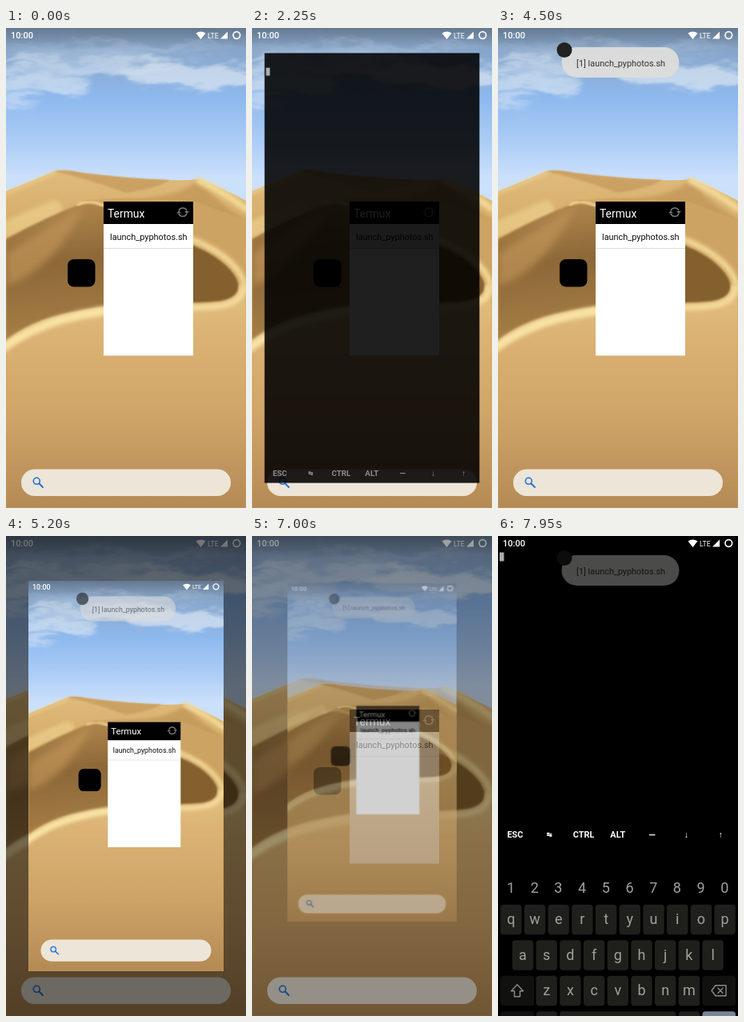
Animation of 300x600 px, one loop 8000 ms. Source, as an HTML page:

```html
<!DOCTYPE html>
<html lang="en">
<head>
<meta charset="utf-8">
<title>Launching a script from a widget</title>
<style>
html, body { margin: 0; width: 100%; height: 100%; overflow: hidden; background: #000; }
svg { display: block; width: 100vw; height: 100vh; }
text { font-family: Roboto, sans-serif; }
.mid { text-anchor: middle; }
.line { fill: none; stroke-linecap: round; stroke-linejoin: round; }
</style>
</head>
<body>
<svg viewBox="0 0 300 600">
  <defs>
    <linearGradient id="sky" x2="0" y2="1">
      <stop offset="0" stop-color="#64788f"/>
      <stop offset=".12" stop-color="#86a4c8"/>
      <stop offset=".4" stop-color="#8eb9ee"/>
      <stop offset=".65" stop-color="#accdf6"/>
      <stop offset=".85" stop-color="#cbe0fb"/>
    </linearGradient>
    <linearGradient id="far" x2="0" y2="1">
      <stop offset="0" stop-color="#e0bb7c"/>
      <stop offset=".2" stop-color="#d3a966"/>
      <stop offset="1" stop-color="#c39856"/>
    </linearGradient>
    <linearGradient id="face" x2=".2" y2="1">
      <stop offset="0" stop-color="#b58b50"/>
      <stop offset=".45" stop-color="#8d6838"/>
      <stop offset="1" stop-color="#a98048"/>
    </linearGradient>
    <linearGradient id="near" x2="0" y2="1">
      <stop offset="0" stop-color="#e4c180"/>
      <stop offset=".25" stop-color="#dab273"/>
      <stop offset=".6" stop-color="#cfa468"/>
      <stop offset="1" stop-color="#b48a55"/>
    </linearGradient>
    <filter id="cloud" x="-20%" y="-30%" width="140%" height="160%">
      <feGaussianBlur stdDeviation="6 4" result="b"/>
      <feTurbulence type="fractalNoise" baseFrequency=".018 .05" numOctaves="4" seed="4"/>
      <feDisplacementMap in="b" scale="45" xChannelSelector="R" yChannelSelector="G"/>
    </filter>
    <filter id="soft" x="-20%" y="-50%" width="140%" height="200%"><feGaussianBlur stdDeviation="5"/></filter>
    <filter id="edge" x="-10%" y="-20%" width="120%" height="140%"><feGaussianBlur stdDeviation="1"/></filter>
    <filter id="glow" x="-20%" y="-30%" width="140%" height="160%"><feGaussianBlur stdDeviation="2.500"/></filter>
    <clipPath id="stage"><rect width="300" height="600"/></clipPath>
    <clipPath id="row"><rect x="122" y="245" width="112" height="31"/></clipPath>

    <g id="wall" clip-path="url(#stage)">
      <rect width="300" height="220" fill="url(#sky)"/>
      <g filter="url(#cloud)" fill="#eaf0f6">
        <ellipse cx="100" cy="44" rx="110" ry="10" opacity=".5"/>
        <ellipse cx="225" cy="58" rx="90" ry="14" opacity=".6"/>
        <ellipse cx="40" cy="68" rx="60" ry="13" opacity=".55"/>
        <ellipse cx="5" cy="92" rx="32" ry="7" opacity=".5"/>
        <ellipse cx="140" cy="26" rx="150" ry="5" opacity=".25"/>
      </g>
      <path d="M0 204Q35 190 60 179Q72 176 95 181Q150 188 205 190Q225 191 240 189Q262 196 300 216V600H0Z" fill="url(#far)"/>
      <path d="M60 179Q72 176 95 181Q150 188 205 190Q190 200 150 206Q100 188 60 179Z" fill="#c3995a" opacity=".7" filter="url(#edge)"/>
      <path d="M240 189Q225 208 170 214L234 226Q280 235 300 275V240Q265 220 240 189Z" fill="#b98e50" opacity=".6" filter="url(#glow)"/>
      <g class="line" stroke="#f3d996" filter="url(#glow)">
        <path d="M241 191Q268 202 300 226" stroke-width="8"/>
        <path d="M-5 208Q30 194 60 181" stroke-width="4" opacity=".7"/>
        <path d="M-5 254Q25 240 60 226" stroke-width="20" opacity=".55"/>
      </g>
      <path d="M0 264Q50 236 103 216Q125 224 150 238Q195 270 240 275Q300 295 300 345L230 352Q120 345 60 368Q25 380 0 396Z" fill="url(#face)" filter="url(#edge)"/>
      <path d="M0 282Q50 250 98 222Q75 270 40 300Q20 316 0 322Z" fill="#c09458" opacity=".7" filter="url(#soft)"/>
      <path d="M103 216Q165 236 210 262Q260 280 300 340V240L240 218Q170 208 103 216Z" fill="#cda363" filter="url(#edge)"/>
      <path class="line" d="M90 221Q103 214 122 222" stroke="#efd392" stroke-width="3" filter="url(#edge)"/>
      <path d="M200 262Q234 268 262 286Q290 306 291 324Q289 339 262 342L180 345Z" fill="#84602f" filter="url(#edge)"/>
      <path class="line" d="M195 254Q236 262 264 280Q297 302 299 326" stroke="#f3d996" stroke-width="7" filter="url(#glow)"/>
      <path d="M0 391Q28 368 70 358Q130 344 190 344Q240 345 268 342Q291 338 291 322L300 318V600H0Z" fill="url(#near)" filter="url(#edge)"/>
      <g class="line" stroke="#f8e2a4" filter="url(#glow)">
        <path d="M-6 402Q26 377 72 364Q120 351 170 350" stroke-width="11"/>
        <path d="M200 349Q245 351 270 347Q296 342 297 324" stroke-width="7" opacity=".85"/>
      </g>
    </g>

    <g id="widget">
      <rect x="77" y="289" width="34.500" height="34.500" rx="8"/>
      <rect x="122" y="217" width="112" height="192.500" fill="#fff"/>
      <rect x="122" y="217" width="112" height="28"/>
      <text x="127" y="236.500" font-size="13.900" fill="#fff">Termux</text>
      <g fill="none" stroke="#777" stroke-width="1.600">
        <path d="M216 228.500A5.300 5.300 0 0 1 226 228.500M226 232A5.300 5.300 0 0 1 216 232"/>
        <path d="M223 229H229L226 232ZM213 231.500H219L216 228.500Z" fill="#777" stroke="none"/>
      </g>
      <rect x="122" y="275" width="112" height="1" fill="#ddd"/>
    </g>
    <text id="item" x="130" y="264.500" font-size="10.900" fill="#111">launch_pyphotos.sh</text>

    <g id="search">
      <rect x="19" y="551.500" width="262" height="33.500" rx="16.700" fill="#ede5d7"/>
      <path class="line" d="M41.500 569.500L46 574" stroke="#1a6fdc" stroke-width="1.800"/>
      <circle cx="38.300" cy="566.300" r="4" fill="none" stroke="#1a6fdc" stroke-width="1.600"/>
    </g>

    <g id="status" fill="#fff">
      <text x="6" y="13" font-size="11" font-weight="500">10:00</text>
      <path d="M237.500 6.500Q243.500 2.500 249.500 6.500L243.500 14Z"/>
      <text x="252" y="12.500" font-size="8.800">LTE</text>
      <path d="M268 13.500H277V4.500Z"/>
      <circle cx="288.300" cy="9" r="4.300" fill="none" stroke="#fff" stroke-width="1.700"/>
    </g>

    <g id="toast">
      <rect x="79.500" y="24" width="147" height="38" rx="19" fill="#dedddb" opacity=".95"/>
      <text x="98" y="47.500" font-size="10.900" fill="#333">[1] launch_pyphotos.sh</text>
      <circle cx="83" cy="27.500" r="9.500" fill="#222"/>
    </g>
  </defs>

  <use href="#wall"/>
  <use href="#widget"/>
  <g clip-path="url(#row)"><circle id="ripple" cx="180" cy="261" r="37"/></g>
  <use href="#item"/>
  <use href="#search"/>

  <g id="term">
    <rect width="300" height="600"/>
    <rect x="2" y="20.500" width="5.500" height="11" fill="#aaa"/>
    <g id="extra" class="mid" fill="#fff" font-size="10.900" font-weight="700"></g>
  </g>
  <g id="keys" class="mid" font-size="18" fill="#a0a09c"></g>
  <use href="#status"/>
  <use id="note" href="#toast"/>

  <rect id="scrim" width="300" height="600"/>
  <g id="shot">
    <use href="#wall"/>
    <use href="#widget"/>
    <use href="#item"/>
    <use href="#search"/>
    <use href="#status"/>
    <use href="#toast" opacity=".6"/>
  </g>
  <g id="tools" class="line" stroke="#fff" stroke-width="1.500">
    <path d="M34 561L42 557M34 563L42 568"/>
    <g fill="#333"><circle cx="32" cy="562" r="2.600"/><circle cx="43.500" cy="556.500" r="2.600"/><circle cx="43.500" cy="568.500" r="2.600"/></g>
    <path d="M105 570V566.500L115.500 556Q117 554.500 118.500 556L119 556.500Q120.500 558 119 559.500L108.500 570ZM113.500 558L117 561.500"/>
    <path stroke="#aaa" stroke-width="1.300" d="M182 559V555H193V559M182 565V569.500H193V565M193 560V563M182 561V563M180 555L195 570"/>
    <path d="M256.500 557H268.500M260 557V554.500H265V557M257.500 557V570H267.500V557M261 560.500V566.500M264 560.500V566.500"/>
  </g>
  <rect id="flash" width="300" height="600" fill="#fff"/>
</svg>
<script>
const $ = id => document.getElementById(id);
const clamp = x => Math.max(0, Math.min(1, x));
const ramp = (t, from, dur) => clamp((t - from) / dur);
const smooth = x => x * x * (3 - 2 * x);
const out = (x, n) => 1 - Math.pow(1 - x, n);
const fade = (id, a) => {
  $(id).setAttribute('opacity', a.toFixed(3));
  $(id).setAttribute('display', a > 0 ? 'inline' : 'none');
};
const scaled = (id, s, dy = 0) =>
  $(id).setAttribute('transform', `translate(150 ${300 + dy}) scale(${s}) translate(-150 -300)`);

const KEYBOARD = 214;   // height of the soft keyboard
const LOOP = 8000;
const TAPS = [2000, 7550];

function buildKeys() {
  const label = (x, y, s, extra = '') => `<text x="${x}" y="${y}" ${extra}>${s}</text>`;
  const key = (x, y, w, fill = '#1f1f1c') =>
    `<rect x="${x}" y="${y}" width="${w}" height="37.500" rx="4" fill="${fill}"/>`;
  const row = (chars, x0, y) => [...chars].map((c, i) => {
    const x = x0 + i * 29.7;
    return key(x - 13.2, y, 26.4) + label(x, y + 24.5, c);
  }).join('');

  $('extra').innerHTML = ['ESC', '↹', 'CTRL', 'ALT', '―', '↓', '↑']
    .map((s, i) => label(21.4 + i * 42.8, i === 1 ? 376 : 377, s, i === 1 ? 'font-size="8"' : '')).join('');

  // Laid out with its top edge at y = 386
  $('keys').innerHTML = `<rect y="386" width="300" height="${KEYBOARD}" fill="#000"/>` +
    [...'1234567890'].map((c, i) => label(16 + i * 29.7, 409.5, c)).join('') +
    row('qwertyuiop', 16.3, 424) + row('asdfghjkl', 31, 468.5) + row('zxcvbnm', 60.7, 513) +
    key(3, 513, 42, '#11110f') + key(255.5, 513, 41.5, '#11110f') +
    key(3, 557.5, 42, '#11110f') + key(48, 557.5, 26) + key(77, 557.5, 145.5) +
    key(226, 557.5, 26) + key(255.5, 557.5, 41.5, '#778696') +
    `<g class="line" stroke="#8c8c88" stroke-width="1.400">
      <path d="M24 524L31.500 532H27.500V539H20.500V532H16.500Z"/>
      <path d="M267 531.500L272 525H285V538H272ZM275 528.500L281 534.500M281 528.500L275 534.500"/></g>`;
}

function draw(t) {
  const tap = t >= TAPS[1] ? TAPS[1] : TAPS[0];
  const d = t - tap;
  const first = tap === TAPS[0];

  // Ripple on the tapped row
  $('ripple').setAttribute('r', 37 + 60 * out(ramp(d, 0, 300), 2));
  fade('ripple', d >= 0 && d < 600 ? .12 * (1 - ramp(d, 350, 250)) : 0);

  // Terminal window opens, then closes when the script ends
  const close = first ? ramp(t, 3450, 300) : 0;
  fade('term', ramp(d, 165, 98) * (1 - close));
  scaled('term', .85 + .15 * smooth(ramp(d, 165, 235)) - .12 * smooth(close));
  fade('extra', ramp(d, 165, 170));

  // Soft keyboard
  const hide = first ? ramp(t, 3350, 200) : 0;
  const up = out(ramp(d, 290, 250), 3) * (1 - hide * hide);
  fade('keys', up > 0 ? 1 : 0);
  $('keys').setAttribute('transform', `translate(0 ${(KEYBOARD * (1 - up)).toFixed(2)})`);
  const raised = d >= 340 && hide === 0;
  $('extra').setAttribute('transform', `translate(0 ${raised ? 0 : 213.5})`);

  // Session toast
  fade('note', ramp(d, 360, 115) * (first ? 1 - ramp(t, 4900, 250) : 1));

  // Screenshot preview
  const drop = ramp(t, 5000, 400);
  const leave = ramp(t, 6770, 480);
  const live = t >= 5000 && leave < 1;
  fade('scrim', live ? .72 * out(drop, 2) * (1 - leave) : 0);
  fade('shot', live ? 1 - leave : 0);
  scaled('shot', 1 - .222 * out(drop, 2.64) - .1 * out(leave, 2), -40 * out(leave, 2));
  fade('flash', t >= 5000 && t < 5150 ? .5 * Math.sin(Math.PI * ramp(t, 5000, 150)) : 0);
  fade('tools', ramp(t, 5700, 100) * (1 - ramp(t, 6770, 200)));
}

buildKeys();
const start = performance.now();
function tick() {
  draw((performance.now() - start) % LOOP);
  requestAnimationFrame(tick);
}
draw(0);
requestAnimationFrame(tick);
</script>
</body>
</html>
```
